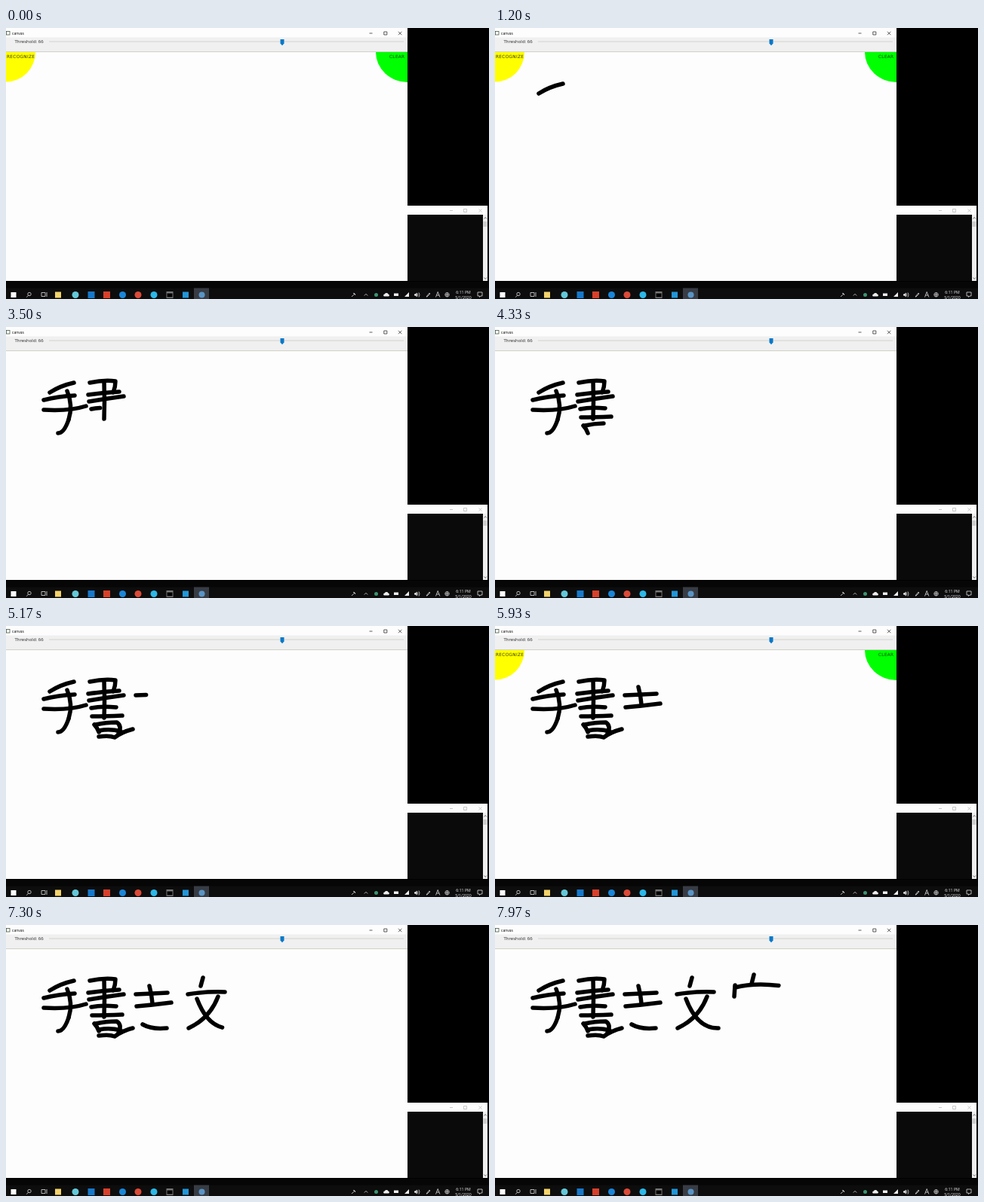
These frames come from a looping animation (640 px wide and 360 px high, 8 s). An HTML page:

```html
<!DOCTYPE html>
<html lang="en">
<head>
<meta charset="utf-8">
<style>
  html, body { margin: 0; width: 100%; height: 100%; overflow: hidden; background: #000; }
  svg { display: block; width: 100vw; height: 100vh; }
  text { font-family: "Open Sans", sans-serif; }
  .label { font: 5.8px "DejaVu Sans", sans-serif; letter-spacing: .3px; }
  .thin { fill: none; stroke-width: .8; }
  #ink path { fill: none; stroke: #000; stroke-width: 5.5; stroke-linecap: round; stroke-linejoin: round; }
</style>
</head>
<body>
<svg viewBox="0 0 640 360">
  <rect width="640" height="360" fill="#000"/>

  <!-- console window -->
  <rect x="532" y="236" width="106" height="12" fill="#fdfdfd"/>
  <path class="thin" stroke="#bbb" d="M588 242.500h4M606.500 240.500h4v4h-4zM626.500 240.500l4 4m0-4l-4 4"/>
  <rect x="532" y="248" width="100" height="88" fill="#0a0a0a"/>
  <rect x="632" y="248" width="6" height="88" fill="#f0f0f0"/>
  <rect x="632.500" y="257" width="5" height="7" fill="#cdcdcd"/>
  <path class="thin" stroke="#555" d="M633.500 253.500l1.700-2 1.700 2M633.500 331.500l1.700 2 1.700-2"/>

  <!-- canvas window -->
  <rect width="532" height="336" fill="#fdfdfd"/>
  <rect y="12.500" width="532" height="19" fill="#f0f0f1"/>
  <path class="thin" stroke="#c4c4b8" d="M0 31.600H532"/>
  <rect x=".5" y="4.500" width="4.500" height="4.500" fill="#fff" stroke="#455845" stroke-width=".8"/>
  <text x="8" y="8.600" font-size="5">canvas</text>
  <path class="thin" stroke="#333" d="M481.500 7h4M500.800 5h4v4h-4zM520 4.800l4.400 4.400m0-4.400l-4.400 4.400"/>
  <text x="11.500" y="20.300" font-size="6" fill="#222">Threshold: 66</text>
  <path d="M57 18H527" stroke="#d2d2cc"/>
  <path d="M363.500 15h5v5.500l-2.500 2.700-2.500-2.700z" fill="#0878c8"/>

  <g id="buttons">
    <path d="M0 32H39A39 39.500 0 0 1 0 71.500z" fill="#ff0"/>
    <path d="M532 32V72A42 40 0 0 1 490 32z" fill="#0f0"/>
    <text class="label" x="1" y="40.200" fill="#333300">RECOGNIZE</text>
    <text class="label" x="508" y="40.200" fill="#004400">CLEAR</text>
  </g>
  <g id="ink"></g>

  <!-- taskbar -->
  <rect y="337" width="640" height="23" fill="#060606"/>
  <rect y="345.500" width="640" height="14.500" fill="#0d0d0d"/>
  <rect x="249" y="345.500" width="20" height="14.500" fill="#383c44"/>
  <g id="icons"></g>
  <g class="thin" stroke="#ddd">
    <circle cx="31" cy="353.500" r="2.200"/>
    <path d="M29.500 355.200l-2.300 2.500M47 351.500h5v5h-5zM54 351v6"/>
    <path d="M458 357l3-3m-1-2l3 3m-2-3l2 2M474.800 355.500l2.200-2.200 2.200 2.200M545 352.500q1.500 2 0 4M547 351.500q2 3 0 6M557 357l4-5 1 1-4 4z"/>
    <path d="M569.500 357.500l2.700-7 2.700 7M570.500 355h3.500"/>
    <circle cx="584.500" cy="354.300" r="2.700"/>
    <path d="M582 354.300h5M584.500 351.500v5.500M625 351h6v5h-2l-1.500 1.500v-1.500H625z"/>
  </g>
  <path fill="#eee" d="M501 356.500a1.600 1.600 0 0 1 .8-3 2.600 2.600 0 0 1 4.700 0 1.600 1.600 0 0 1 .5 3zM514 352.500h6v3.500h-6zM541 353.500h1.500l2-2v6l-2-2H541zM528 357l6-6v6z"/>
  <g fill="#eee" font-size="5.200" text-anchor="middle">
    <text x="606" y="352.500">6:11 PM</text>
    <text x="606" y="360">5/1/2020</text>
  </g>
</svg>

<script>
const LOOP = 8000;
const svg = (tag, attrs, parent) => {
  const node = document.createElementNS(document.querySelector('svg').namespaceURI, tag);
  for (const key in attrs) node.setAttribute(key, attrs[key]);
  return parent.appendChild(node);
};

// Taskbar items: shape, centre x, size, colour
const icons = document.getElementById('icons');
[
  ['square', 15, 7, '#fff'], ['square', 69, 8, '#f3d36b'], ['circle', 92, 9, '#64c8d8'],
  ['square', 113, 9, '#1779cb'], ['square', 133.5, 9, '#d8402c'], ['circle', 154.5, 9, '#1a86d8'],
  ['circle', 175, 9, '#dc4a38'], ['circle', 196, 9, '#2cb8e8'], ['square', 217, 9, '#777'],
  ['square', 238, 8, '#2196d8'], ['circle', 259.5, 8, '#5a94c4'], ['circle', 490.5, 5, '#3c9470']
].forEach(([shape, x, size, fill]) => shape === 'circle'
  ? svg('circle', { cx: x, cy: 354.5, r: size / 2, fill }, icons)
  : svg('rect', { x: x - size / 2, y: 354.5 - size / 2, width: size, height: size, fill }, icons));
icons.firstChild.setAttribute('x', 6.5);
svg('rect', { x: 213.5, y: 352.5, width: 7, height: 5, fill: '#000' }, icons);

// Pen strokes: start ms, end ms, path
const ink = document.getElementById('ink');
const strokes = [
  [950, 1190, 'M58 87Q72 78 90 74'],
  [1290, 1460, 'M50 97Q70 92 91 91'],
  [1540, 1740, 'M50 110Q84 112 106 105'],
  [1830, 2000, 'M81 85Q89 104 83 123'],
  [2060, 2220, 'M83 123Q77 141 69 141'],
  [2380, 2620, 'M111 74Q130 70 145 72Q145 80 142 87'],
  [2700, 2850, 'M109 90Q130 87 150 86'],
  [2920, 3080, 'M110 99Q134 95 156 92'],
  [3160, 3360, 'M130 73Q131 98 130 122'],
  [3450, 3590, 'M113 109Q126 106 146 108'],
  [3670, 3830, 'M114 120Q132 120 154 119'],
  [3920, 4060, 'M117 131Q121 135 123 141'],
  [4140, 4480, 'M119 131Q132 128 147 128Q154 133 149 143'],
  [4560, 4700, 'M123 139Q138 136 152 140'],
  [4770, 5010, 'M123 147Q137 145 144 148Q153 141 168 137'],
  [5120, 5280, 'M172 92Q195 91 214 90'],
  [5380, 5560, 'M173 108Q196 106 219 103'],
  [5670, 5840, 'M190 81Q193 92 194 104'],
  [5980, 6200, 'M181 132Q193 139 213 137'],
  [6440, 6550, 'M261 70L258 81'],
  [6650, 6820, 'M241 92Q266 88 290 89'],
  [6890, 7080, 'M281 95Q270 124 242 137'],
  [7140, 7330, 'M253 98Q268 138 296 137'],
  [7420, 7520, 'M343 66L340 78'],
  [7610, 7710, 'M318 80L317 95'],
  [7770, 7985, 'M318 83Q345 76 380 81']
].map(([start, end, d]) => {
  const node = svg('path', { d, pathLength: 1, 'stroke-dasharray': '1 2' }, ink);
  return { start, end, node };
});

const buttons = document.getElementById('buttons');

function draw(t) {
  let penDown = false;
  for (const { start, end, node } of strokes) {
    const done = Math.min(1, Math.max(0, (t - start) / (end - start)));
    node.style.display = t < start ? 'none' : '';
    node.style.strokeDashoffset = 1 - done;
    penDown ||= t >= start && t < end;
  }
  // The on-canvas buttons hide while the pen touches the canvas.
  buttons.style.display = penDown ? 'none' : '';
}

const begin = performance.now();
function frame() {
  draw((performance.now() - begin) % LOOP);
  requestAnimationFrame(frame);
}
frame();
</script>
</body>
</html>
```
